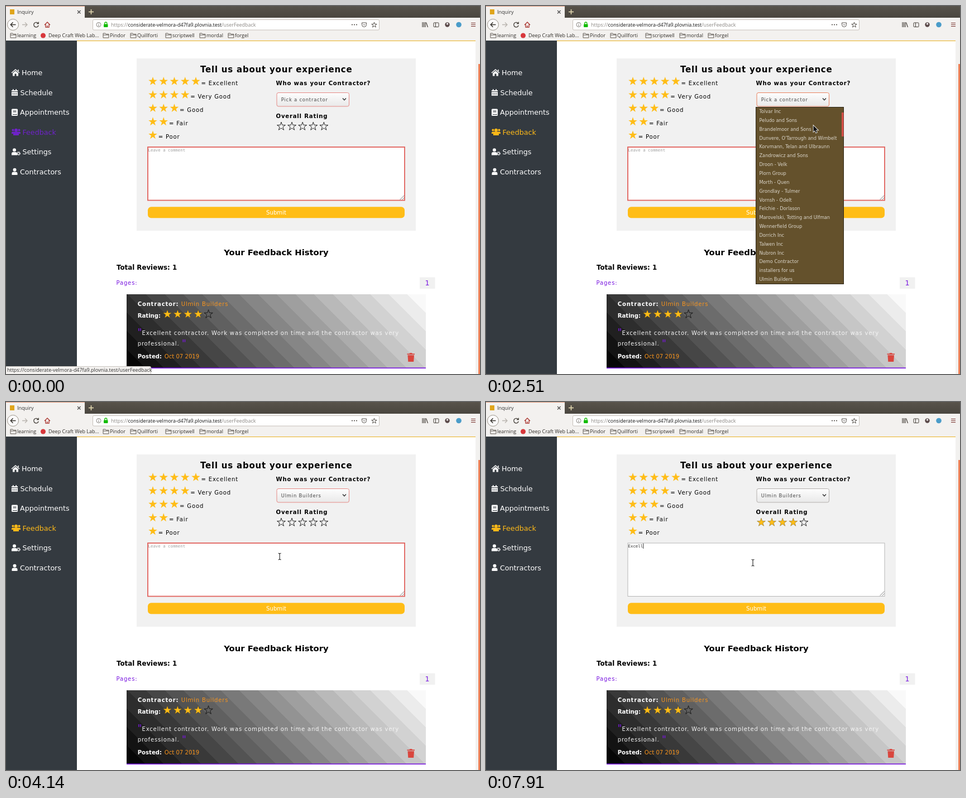
These frames come from a looping animation (849x660 px, 8000 ms). An HTML page:

```html
<!DOCTYPE html>
<html lang="en">
<head>
<meta charset="utf-8">
<title>Inquiry</title>
<style>
  html, body { margin: 0; width: 100%; height: 100%; overflow: hidden; background: #fff; }
  svg { display: block; width: 849px; height: 660px; }
  text { font-family: "DejaVu Sans", sans-serif; white-space: pre; }
  .ui { font-family: "Open Sans", sans-serif; }
  .mono { font-family: "DejaVu Sans Mono", monospace; }
  .b { font-weight: bold; }
  .w { letter-spacing: .79px; }
  .mid { text-anchor: middle; }
</style>
</head>
<body>
<svg id="stage" viewBox="0 0 849 660"></svg>
<script>
const GOLD = '#ffbd17', RED = '#e0625c', PURPLE = '#7a18e0', ORANGE = '#f7941d';
const DOMAIN = 'considerate-velmora-d47fa9.plovnia.test', PAGE = '/userFeedback';
const PICKED = 'Ulmin Builders';
const NAMES = ['Pick a contractor', 'Velmarro Contractor1', 'Ubo', 'Dofmp wqe', 'Tolvar Inc',
  'Peludo and Sons', 'Brandelmoor and Sons', "Dunvere, O'Tarrough and Wimbelt",
  'Korvmann, Telan and Ulbraunn', 'Zandrowicz and Sons', 'Droon - Velk', 'Plorn Group',
  'Morth - Quen', 'Grondlay - Tulmer', 'Vornsh - Odelt', 'Felchie - Dorlason',
  'Marovelski, Totting and Ulfman', 'Wennerfield Group', 'Dorrich Inc', 'Talwen Inc',
  'Nubron Inc', 'Demo Contractor', 'installers for us', PICKED];
const ROW = 15.85, ROWS = 20, LIST_TOP = 181, BANDS = 20;

// Markup helpers
const rect = (x, y, w, h, fill, more = '') =>
  `<rect x="${x}" y="${y}" width="${w}" height="${h}" fill="${fill}" ${more}/>`;
const text = (x, y, s, size = 10.12, fill = '#000', cls = '', more = '') =>
  `<text x="${x}" y="${y}" font-size="${size}" fill="${fill}" class="${cls}" ${more}>${s}</text>`;
const path = (d, fill, more = '') => `<path d="${d}" fill="${fill}" ${more}/>`;
const line = (d, color, width = 1, more = '') =>
  path(d, 'none', `stroke="${color}" stroke-width="${width}" ${more}`);
const dot = (x, y, r, fill, more = '') => `<circle cx="${x}" cy="${y}" r="${r}" fill="${fill}" ${more}/>`;
const group = (id, body, more = '') => `<g id="${id}" ${more}>${body}</g>`;
const repeat = (n, fn) => Array.from({ length: n }, (_, i) => fn(i)).join('');

function star(cx, cy, r, fill, more = '') {
  const pts = repeat(10, i => {
    const a = (i / 5 - .5) * Math.PI, k = i % 2 ? r * .39 : r;
    return `${(cx + k * Math.cos(a)).toFixed(2)},${(cy + k * Math.sin(a)).toFixed(2)} `;
  });
  return `<polygon points="${pts}" fill="${fill}" ${more}/>`;
}

const person = (x, y) => dot(x, y - 3.2, 3, 'currentColor') +
  path(`M${x - 5} ${y + 6}v-2.5q0-3 3-3h4q3 0 3 3v2.5z`, 'currentColor');

function browser() {
  const folder = x => path(`M${x} 57v-8h4l1 1.5h5v6.5z M${x} 52h10`, 'none', 'stroke="#625d57"');
  const marks = [[8, 'learning'], [174, 'Pindor'], [223, 'Quillforti'], [286, 'scriptwell'],
    [347, 'mordal'], [398, 'forgel']];
  return rect(0, 0, 849, 62, '#f3f1ef') + rect(0, 0, 849, 21, 'url(#bar)') +
    rect(0, 0, 141, 21, '#f3f1ef') + rect(0, 0, 141, 1, '#e39a7c') +
    rect(7, 6, 8, 9, '#e0a51b') + text(20, 13.5, 'Inquiry', 9, '#333', 'ui') +
    line('M128 8l5.5 5.5m0-5.5L128 13.5', '#444', 1.1) + line('M152.5 6v9M148 10.5h9', '#eadfb5', 1.5) +
    dot(12.5, 33.5, 10, '#fbfafa', 'stroke="#999389"') +
    line('M17.5 33.5h-9m4-4.2l-4.2 4.2l4.2 4.2', '#38342f', 1.5) +
    line('M29 33.5h9m-4-4l4 4l-4 4', '#b9b5af', 1.3) +
    line('M57.5 31a4.3 4.3 0 1 0 .7 3.8M58.3 28.5v3.2h-3.2', '#46413b', 1.3) +
    line('M69 34l5-5 5 5M71 33v5.2h6V33M74 38v-3', '#a8322c', 1.3) +
    rect(155.5, 24.5, 513, 18.5, '#fff', 'rx="2" stroke="#c6c0b9"') +
    dot(166, 33.5, 4, 'none', 'stroke="#77736e" stroke-width=".9"') +
    line('M166 33v3M166 30.8v1', '#77736e') +
    rect(175, 32.5, 7.5, 5.5, '#12bc00', 'rx="1"') +
    line('M176.8 33v-2a2 2 0 0 1 4 0v2', '#12bc00', 1.3) +
    `<text x="188" y="36.7" font-size="8.95" class="ui" fill="#8b8783">https://<tspan fill="#151515">${DOMAIN}</tspan>${PAGE}</text>` +
    [620, 624, 628].map(x => dot(x, 33.5, 1.1, '#56514c')).join('') +
    line('M637.5 30h8v3.5a4 4 0 0 1-8 0zM639.5 32.5l2 2 2-2', '#56514c') +
    star(659.5, 34, 5, 'none', 'stroke="#56514c"') +
    line('M746 29v9m2.5-9v9m2.5-9v9m1.5-8.5l3 8.5', '#46413b', 1.2) +
    rect(766, 30, 9, 7.5, 'none', 'stroke="#46413b" rx="1"') + line('M769.5 30v7.5', '#46413b') +
    dot(790.5, 33.5, 4.2, '#5b4a4a') + dot(790.5, 32, 1.7, '#eee') +
    dot(811, 33.5, 4.8, '#4a9cc9') +
    line('M833 30.5h8m-8 3h8m-8 3h8', '#7a3530', 1.2) +
    marks.map(([x, s]) => folder(x) + text(x + 12, 56, s, 9, '#33302c', 'ui')).join('') +
    dot(66.5, 53, 4.5, '#d8373b') + text(76, 56, 'Deep Craft Web Lab…', 9, '#33302c', 'ui');
}

function sidebar() {
  const item = (x, y, s) => text(x, y + 4.6, s, 12.65, 'currentColor');
  const y = i => 119.6 + 35.5 * i;
  return rect(0, 62, 127, 598, '#343a40') + `<g color="#fff">` +
    item(28, y(0), 'Home') + line('M10 120l7-6 7 6M22 114v3', '#fff', 1.5) +
    path('M12 120.5l5-4.3 5 4.3v5h-3.5v-4h-3v4H12z', '#fff') +
    item(25.5, y(1), 'Schedule') +
    path('M10 151h11v2H10zM10 154h11v7H10zM12 149h1.6v3H12zM17.4 149h1.6v3h-1.6z', '#fff') +
    line('M11.5 156.5h8M11.5 159h8', '#343a40', 1.2, 'stroke-dasharray="2 1"') +
    item(25, y(2), 'Appointments') + rect(10, 184.5, 11, 12.5, '#fff', 'rx="1.5"') +
    line('M12.5 188h6m-6 2h6M12 194.5h8', '#343a40') + '</g>' +
    group('link', item(29.5, y(3), 'Feedback') +
      dot(12.5, 222.5, 2, 'currentColor') + dot(23.5, 222.5, 2, 'currentColor') +
      path('M10 229v-2q0-1.5 2-1.5h12q2 0 2 1.5v2z', 'currentColor') + person(18, 226)) +
    '<g color="#fff">' + item(29.5, y(4), 'Settings') + person(15, 261.5) +
    dot(22.5, 264.5, 2.3, 'none', 'stroke="#fff" stroke-width="2" stroke-dasharray="1.5 .5"') +
    item(25, y(5), 'Contractors') + person(15.5, 297) + '</g>';
}

function form() {
  const words = ['Excellent', 'Very Good', 'Good', 'Fair', 'Poor'];
  return rect(127, 61, 714, 2, '#eab120') + rect(841, 62, 8, 598, '#f2f1ef') +
    rect(846, 104, 3, 556, '#ef8258') + rect(234, 94, 500, 309, '#f1f1f1') +
    text(348, 118.5, 'Tell us about your experience', 15, '#000', 'b w') +
    words.map((s, i) => repeat(5 - i, k => star(263 + 19.25 * k, 135.2 + 24.1 * i, 8.2, GOLD)) +
      text(349.5 - 19.2 * i, 141.5 + 24.1 * i, '= ' + s, 10.12, '#000', 'w')).join('') +
    text(483.5, 142.3, 'Who was your Contractor?', 10.15, '#000', 'b w') +
    text(483.5, 200.5, 'Overall Rating', 10.15, '#000', 'b w') +
    rect(485, 155.5, 129.5, 24.5, 'url(#light)', 'id="select" rx="3"') +
    text(492.8, 170.8, '', 8.4, '#444', 'w', 'id="label"') +
    line('M603 165.5l3 3.2 3-3.2', '#333', 1.4) +
    group('rating', repeat(5, i => star(493 + 19.1 * i, 216, 7.8, 'none', 'stroke="#111" stroke-width=".9"'))) +
    rect(254, 253, 460, 95.5, '#fff', 'id="area"') +
    line('M705.5 347.5l8-8m-4 8l4-4', '#777', .9) +
    text(254.5, 261, '', 7.39, '#a3a3a3', 'mono', 'id="comment"') +
    rect(254, 253.5, .9, 9.5, '#222', 'id="caret"') +
    rect(254, 360.2, 460, 20, GOLD, 'rx="6"') + text(484, 374, 'Submit', 10.12, '#fff', 'mid');
}

function history() {
  return text(484, 447.3, 'Your Feedback History', 14.8, '#000', 'b mid') +
    text(198, 472.8, 'Total Reviews: 1', 11.8, '#000', 'b') +
    text(197.5, 500, 'Pages:', 10.12, PURPLE, 'w') +
    rect(741, 486.5, 27.5, 20.5, '#f1f1f1') + text(754.5, 501.3, '1', 12.65, PURPLE, 'mid') +
    rect(216, 517, 536, 132, 'url(#fade)') +
    rect(216, 648.5, 536, 1.6, PURPLE) +
    text(235.7, 537.8, 'Contractor:', 10.12, '#fff', 'b w') + text(313.7, 537.8, PICKED, 10.12, ORANGE, 'w') +
    text(235.7, 559, 'Rating:', 10.12, '#fff', 'b') +
    repeat(5, i => star(289 + 18.4 * i, 552.8, 8.1, i < 4 ? GOLD : 'none',
      `stroke="${i < 4 ? '#4a3a10' : '#111'}" stroke-width="${i < 4 ? .4 : .9}"`)) +
    text(235.5, 590.5, '"', 17, PURPLE) +
    text(243.5, 590, 'Excellent contractor. Work was completed on time and the contractor was very', 10.12, '#f5f5f5', 'w') +
    text(235.7, 608.7, 'professional.', 10.12, '#f5f5f5', 'w') + text(315, 611, '"', 17, PURPLE) +
    text(235.7, 632, 'Posted:', 10.12, '#fff', 'b') + text(283.7, 632, 'Oct 07 2019', 10.12, ORANGE) +
    path('M718.5 623.5h4l1-1.2h3.5l1 1.2h4v1.7h-13.5zM719.5 626.2h11.5l-.8 11.8h-9.9z', '#d9463e');
}

const popup = () => rect(483.5, 181.5, 157, 317, '#64512c', 'stroke="#2c2617"') +
  group('hover', rect(484, 0, 149, ROW, '#d64f48') + rect(484, 0, 149, 4.5, '#ee8057')) +
  rect(637, 0, 3.5, 43, '#d64f48', 'id="thumb"') +
  repeat(ROWS, i => text(489.5, 192 + ROW * i, '', 8.2, '#dcd7cc', 'item'));

function cursors() {
  const bar = 'M-2.5-5.5q2.5 0 2.5 1.5q0-1.5 2.5-1.5M0-4v9M-2.5 6q2.5 0 2.5-1.5q0 1.5 2.5 1.5';
  return path('M0 0v11l2.5-2.3 1.9 4.3 1.9-.9-1.9-4.1h3.6z', '#111',
    'id="arrow" stroke="#fff" stroke-width="1.6" paint-order="stroke"') +
    group('beam', line(bar, '#fff', 2.4) + line(bar, '#222', 1.1)) +
    path('M-1 0q1.2-1.2 2.2 0v4.5l5 1.2q1 .4.8 1.5l-.8 4.8h-5.7l-3.8-5q.5-1.5 2.3 0z', '#fff',
      'id="hand" stroke="#111" stroke-width=".9"');
}

// Hard-edged bands from black to white
const bands = repeat(BANDS, i => [i, i + 1].map(edge => {
  const v = Math.round(255 * (i + .5) / BANDS);
  return `<stop offset="${edge / BANDS}" stop-color="rgb(${v},${v},${v})"/>`;
}).join(''));

document.getElementById('stage').innerHTML = `<defs>
  <linearGradient id="bar" x2="0" y2="1"><stop stop-color="#58534b"/><stop offset="1" stop-color="#4a463f"/></linearGradient>
  <linearGradient id="light" x2="0" y2="1"><stop stop-color="#fdfdfd"/><stop offset="1" stop-color="#e9e9e9"/></linearGradient>
  <linearGradient id="fade" gradientUnits="userSpaceOnUse" x1="316.8" y1="750.2" x2="651.2" y2="415.8">${bands}</linearGradient>
  </defs>` + rect(0, 0, 849, 660, '#fff') + form() + history() + sidebar() + browser() +
  group('status', rect(-1, 646.5, 260.5, 15, '#f3f1ef', 'stroke="#c9c5c0" rx="2"') +
    text(2, 656.3, 'https://' + DOMAIN + PAGE, 8.95, '#333', 'ui')) +
  group('popup', popup()) + group('pointer', cursors());

const $ = id => document.getElementById(id);
const items = [...document.querySelectorAll('.item')];
const stars = [...$('rating').children];
const show = (id, on) => $(id).style.display = on ? '' : 'none';
const set = (id, attrs) => Object.entries(attrs).forEach(([k, v]) => $(id).setAttribute(k, v));

// Pointer stops: time, x, y
const ROUTE = [[220, 90, 231], [360, 160, 222], [620, 370, 191], [840, 485, 171], [1020, 509.5, 167],
  [1400, 509.5, 167], [1580, 553, 195], [1760, 586.5, 214.5], [2920, 586.5, 214.5], [3040, 577, 285],
  [3280, 542, 457], [3480, 536, 486], [3770, 536, 486], [3920, 512, 405], [4140, 490, 277],
  [4360, 525, 229], [4550, 551, 215], [4980, 551, 215], [5120, 510, 255], [5270, 478, 288]];
const KEYS = [6110, 6650, 6850, 7050, 7760, 7910];

function pointerAt(t) {
  const i = ROUTE.findIndex(p => p[0] > t);
  if (i < 0) return ROUTE[ROUTE.length - 1].slice(1);
  if (i === 0) return ROUTE[0].slice(1);
  const [a, b] = [ROUTE[i - 1], ROUTE[i]], k = (t - a[0]) / (b[0] - a[0]);
  return [a[1] + (b[1] - a[1]) * k, a[2] + (b[2] - a[2]) * k];
}

function draw(t) {
  const [x, y] = pointerAt(t);
  const onLink = x < 127, open = t >= 1100 && t < 3770;
  $('link').style.color = onLink ? '#6f22c9' : '#fdb918';
  show('status', t < 340);

  // Pointer
  const beam = !open && y > 253 && y < 348 && x > 254;
  const hand = onLink || (t > 4300 && y < 225 && y > 207);
  show('pointer', t >= 220);
  set('pointer', { transform: `translate(${x} ${y})` });
  show('beam', beam);
  show('hand', hand);
  show('arrow', !beam && !hand);

  // Contractor list
  show('popup', open);
  const first = t < 2510 ? 0 : 4;
  const row = Math.max(0, Math.floor((y - LIST_TOP) / ROW));
  const lit = t < 2510 || t >= 2550;
  show('hover', lit);
  set('hover', { transform: `translate(0 ${LIST_TOP + .5 + row * ROW})` });
  set('thumb', { y: first ? 191 : 181.5 });
  items.forEach((el, i) => {
    el.textContent = NAMES[first + i];
    el.setAttribute('fill', lit && i === row ? '#fff' : '#dcd7cc');
  });
  $('label').textContent = t < 3480 ? NAMES[0] : PICKED;
  set('select', {
    fill: t >= 1060 && t < 1210 ? '#e1e1e1' : 'url(#light)',
    stroke: t >= 4550 ? '#b3b0ad' : t >= 1020 && t < 3480 ? '#e8825f' : '#e58a86'
  });

  // Rating
  stars.forEach((el, i) => {
    const on = t >= 4590 && i < 4;
    el.setAttribute('fill', on ? GOLD : 'none');
    el.setAttribute('stroke', on ? '#6a5214' : '#111');
    el.setAttribute('stroke-width', on ? .5 : .9);
  });

  // Comment
  const typed = KEYS.filter(k => t >= k).length;
  $('comment').textContent = typed ? 'Excell'.slice(0, typed) : 'Leave a comment';
  set('comment', { fill: typed ? '#333' : '#a3a3a3' });
  set('caret', { x: 254.6 + 4.45 * typed });
  show('caret', t >= 5270 && !(t >= 6440 && t < 6650) && !(t >= 7620 && t < 7760));
  set('area', typed ? { stroke: '#b0b0b0', 'stroke-width': .9 }
    : t >= 5270 ? { stroke: '#f0a09c', 'stroke-width': 2.4 } : { stroke: RED, 'stroke-width': 1.8 });
}

const start = performance.now();
function tick() {
  draw((performance.now() - start) % 8000);
  requestAnimationFrame(tick);
}
tick();
</script>
</body>
</html>
```
